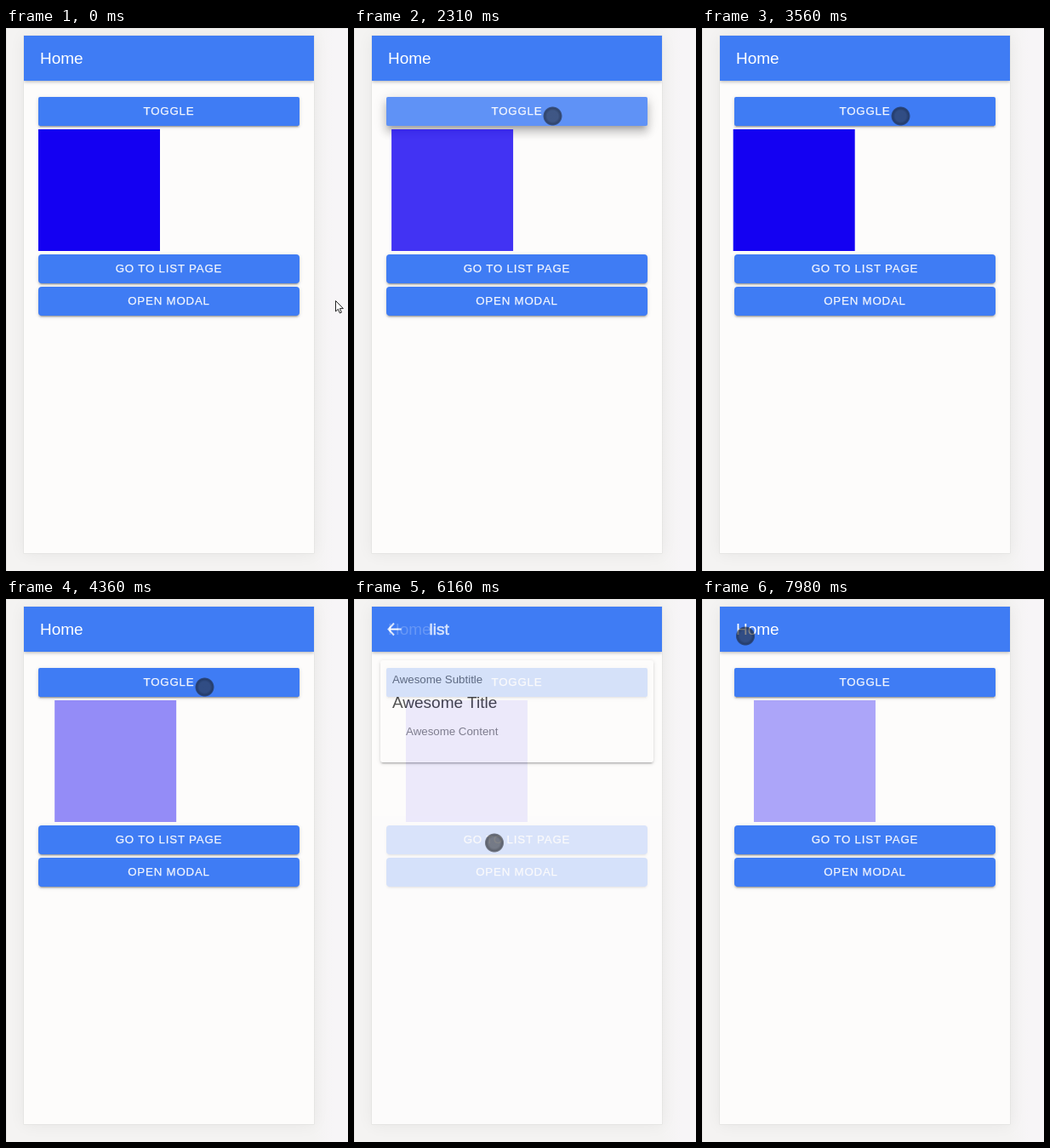
These frames come from a looping animation (402 px wide and 638 px high, 8000 ms). An HTML page:

```html
<!DOCTYPE html>
<html lang="en">
<head>
<meta charset="utf-8">
<title>Home</title>
<style>
  html, body { margin: 0; width: 100%; height: 100%; overflow: hidden; }
  body {
    position: relative;
    background: linear-gradient(90deg, #e9e8e8 1px, #f4f3f2 1px 362px, #f7f5f7 385px);
    font: 13.3px/20px "Liberation Sans", Arial, sans-serif;
  }
  body::before { content: ""; position: absolute; inset: 0 0 auto; height: 1px; background: #e9e8e8; }
  div, svg { position: absolute; }
  #phone {
    left: 21px; top: 9px; width: 340.5px; height: 608px; background: #fdfcfb;
    box-shadow: 0 0 0 .5px #dededc, 0 1px 18px rgba(0, 0, 0, .06);
  }
  .page { inset: 0; overflow: hidden; background: #fdfcfb; }
  .header {
    left: 0; top: 0; width: 100%; height: 53px; background: #3f7cf4;
    box-shadow: 0 1px 4px rgba(0, 0, 0, .3);
  }
  .label { white-space: nowrap; }
  .title { font-size: 19px; color: #fff; top: 16.5px; }
  .button {
    left: 17px; width: 307px; height: 34px; border-radius: 4px; overflow: hidden;
    background: #3f7cf4; color: #f3f6fd; text-align: center; line-height: 33px;
    letter-spacing: .8px; -webkit-text-stroke: .25px;
    box-shadow: 0 3px 1px -2px rgba(0,0,0,.2), 0 2px 2px rgba(0,0,0,.14), 0 1px 5px rgba(0,0,0,.12);
  }
  .button.active {
    box-shadow: 0 5px 5px -3px rgba(0,0,0,.2), 0 8px 10px 1px rgba(0,0,0,.14), 0 3px 14px 2px rgba(0,0,0,.12);
  }
  .ripple { border-radius: 50%; background: #fff; opacity: 0; }
  #square { left: 17px; top: 110px; width: 142.5px; height: 142.5px; background: #1400f2; }
  .card {
    left: 10px; top: 63px; width: 321px; height: 120px; border-radius: 3px; background: #fdfcfb;
    box-shadow: 0 3px 1px -2px rgba(0,0,0,.2), 0 2px 2px rgba(0,0,0,.14), 0 1px 5px rgba(0,0,0,.14);
  }
  #touch {
    left: -11.5px; top: -11.5px; width: 23px; height: 23px; border-radius: 50%;
    background: radial-gradient(closest-side, rgba(38,40,44,.56) 55%, rgba(22,24,28,.64) 82%, rgba(22,24,28,.5) 92%, transparent);
  }
  #arrow { left: 0; top: 0; }
</style>
</head>
<body>
<div id="phone">
  <div class="page">
    <div class="header"><div class="label title" style="left:19px">Home</div></div>
    <div class="button" id="toggle" style="top:72px;border-radius:2px">TOGGLE<div class="ripple"></div></div>
    <div class="button" id="goList" style="top:256.5px">GO TO LIST PAGE<div class="ripple"></div></div>
    <div class="button" style="top:294.5px">OPEN MODAL</div>
    <div id="square"></div>
  </div>
  <div class="page" id="list">
    <div class="header">
      <svg width="60" height="53" fill="none" stroke="#fff" stroke-width="2">
        <path d="M26 19.5L19.5 26.5L26 33.5M19.5 26.5H34.5"/>
      </svg>
      <div id="back"><div class="ripple"></div></div>
      <div class="label title" style="left:67.5px;-webkit-text-stroke:.6px">list</div>
    </div>
    <div class="card">
      <div class="label" style="left:14px;top:12.5px;color:#666">Awesome Subtitle</div>
      <div class="label" style="left:14px;top:40px;font-size:19px;color:#262626">Awesome Title</div>
      <div class="label" style="left:30px;top:73.5px;color:#737373">Awesome Content</div>
    </div>
  </div>
</div>
<div id="cursor">
  <div id="touch"></div>
  <svg id="arrow" width="12" height="18">
    <path d="M.5.5V13L3.4 10.3L5.4 15L7.4 14.1L5.4 9.6H9.4Z" fill="#fff" stroke="#222"/>
  </svg>
</div>
<script>
const LOOP = 8000, CYCLE = 1500, PLAY = 2055, PAUSE = 4567;
const $ = id => document.getElementById(id);
const ramp = (t, from, to) => Math.min(1, Math.max(0, (t - from) / (to - from)));
const smooth = p => p * p * (3 - 2 * p);

// Pointer moves: start, end, x, y
const moves = [
  [20, 290, 237, 310], [600, 710, 225, 235], [980, 1110, 213, 127], [1420, 1620, 233, 103],
  [5000, 5420, 164.5, 286], [6600, 6690, 101, 122], [6910, 7180, 50.5, 43]
];

function drawCursor(t) {
  let x = 387, y = 320;
  for (const [from, to, nextX, nextY] of moves) {
    const p = smooth(ramp(t, from, to));
    x += (nextX - x) * p;
    y += (nextY - y) * p;
  }
  const inside = x < 362;
  $("cursor").style.transform = `translate(${x}px, ${y}px)`;
  $("touch").style.display = inside ? "" : "none";
  $("arrow").style.display = inside ? "none" : "";
}

// Ripple grows from (x, y) inside its host, holds, then fades
function drawPress(id, t, start, x, y, radius) {
  const host = $(id), ripple = host.querySelector(".ripple").style;
  const r = radius * (.1 + .9 * ramp(t, start, start + 225));
  ripple.left = x - r + "px";
  ripple.top = y - r + "px";
  ripple.width = ripple.height = 2 * r + "px";
  ripple.opacity = .17 * ramp(t, start, start + 75) * (1 - ramp(t, start + 450, start + 600));
  host.classList.toggle("active", t > start + 100 && t < start + 500);
}

function drawSquare(t) {
  const playing = t >= PLAY;
  const u = (Math.min(t, PAUSE) - PLAY) % CYCLE / CYCLE;
  const p = playing ? 1.52 * u - .52 * u * u : 0;
  const x = playing ? -1.5 + 31 * p : 0;
  $("square").style.transform = `translateX(${x}px)`;
  $("square").style.opacity = 1 - .83 * p;
}

function draw(t) {
  drawCursor(t);
  drawPress("toggle", t, t < 4000 ? 1910 : 4420, 195, 22, 230);
  drawPress("goList", t, 5640, 126, 20, 230);
  drawPress("back", t, 7490, 27, 26.5, 22);
  drawSquare(t);
  $("list").style.opacity = ramp(t, 5900, 6230) * (1 - ramp(t, 7640, 7975));
}

const began = performance.now();
(function frame() {
  draw((performance.now() - began) % LOOP);
  requestAnimationFrame(frame);
})();
</script>
</body>
</html>
```
